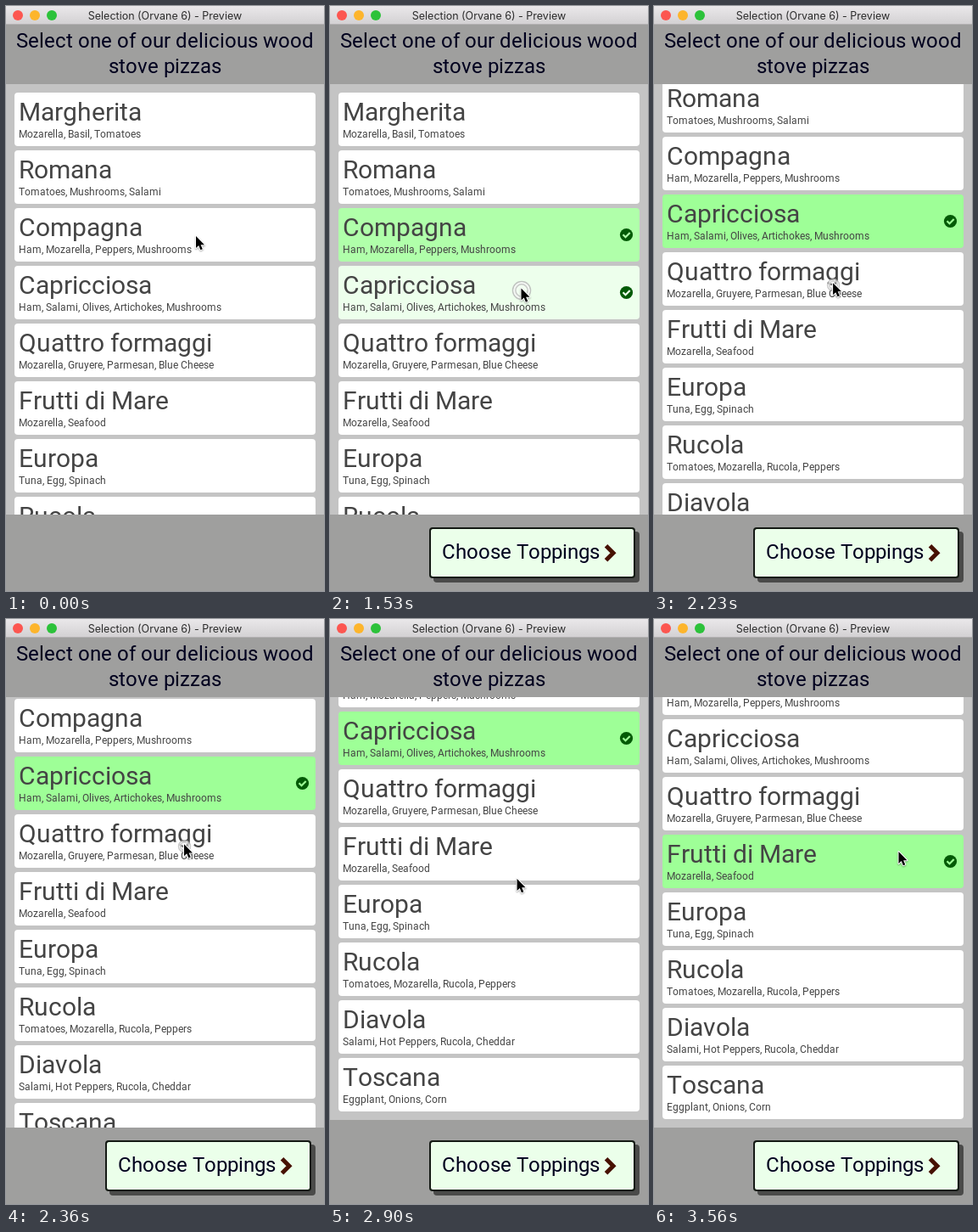
An HTML page with a canvas for the animation above (3.59 s loop, 375 by 689 pixels).

```html
<!DOCTYPE html>
<html lang="en">
<head>
<meta charset="utf-8">
<title>Pizza selection</title>
<style>
  html, body { margin: 0; width: 100%; height: 100%; overflow: hidden; background: #9f9f9e; }
  canvas { display: block; width: 375px; height: 689px; }
</style>
</head>
<body>
<canvas id="stage"></canvas>
<script>
const W = 375, H = 689, LOOP = 3590;
const LIST_TOP = 92, LIST_BOTTOM = 599, ROW_H = 63, ROW_STEP = 68;
const FADE = 300;
const GRAY = '#9f9f9e', NAVY = '#00001e', INK = '#444';
const FACE = 'Roboto, sans-serif';

const pizzas = [
  ['Margherita', 'Mozarella, Basil, Tomatoes'],
  ['Romana', 'Tomatoes, Mushrooms, Salami'],
  ['Compagna', 'Ham, Mozarella, Peppers, Mushrooms'],
  ['Capricciosa', 'Ham, Salami, Olives, Artichokes, Mushrooms'],
  ['Quattro formaggi', 'Mozarella, Gruyere, Parmesan, Blue Cheese'],
  ['Frutti di Mare', 'Mozarella, Seafood'],
  ['Europa', 'Tuna, Egg, Spinach'],
  ['Rucola', 'Tomatoes, Mozarella, Rucola, Peppers'],
  ['Diavola', 'Salami, Hot Peppers, Rucola, Cheddar'],
  ['Toscana', 'Eggplant, Onions, Corn']
];

// time and row of each tap
const taps = [[415, 2], [1476, 3], [3250, 5]];
// press start, release
const presses = [[395, 415], [1435, 1476], [1940, 2400], [3215, 3250]];

// time, x, y of the pointer tip
const pointerKeys = [
  [0, 224, 271], [100, 224, 271], [130, 218.5, 268.5], [1090, 218.5, 268.5],
  [1260, 225.5, 332.5], [1640, 225.5, 332.5], [1830, 221.5, 357], [1910, 215, 411],
  [1960, 214, 411], [2080, 213, 392], [2240, 211, 322], [2360, 210, 265.5],
  [2430, 210, 250], [2600, 212, 255], [2900, 220.5, 306], [3080, 262, 290],
  [3200, 288.5, 274], [LOOP, 288.5, 274]
];
const scrollKeys = [
  [0, 0], [1960, 0], [2080, 18], [2240, 88], [2360, 144], [2480, 180],
  [2620, 203], [2720, 206], [2900, 197], [3080, 188], [LOOP, 188]
];

const canvas = document.getElementById('stage');
const ctx = canvas.getContext('2d');
const dpr = window.devicePixelRatio || 1;
canvas.width = W * dpr;
canvas.height = H * dpr;

const clamp01 = v => Math.max(0, Math.min(1, v));

// Hermite curve through the keys, flat at turning points
function curve(keys, t, c) {
  const slope = i => (keys[i + 1][c] - keys[i][c]) / (keys[i + 1][0] - keys[i][0]);
  const tangent = i => {
    if (i === 0 || i === keys.length - 1) return 0;
    const a = slope(i - 1), b = slope(i);
    return a * b <= 0 ? 0 : 2 * a * b / (a + b);
  };
  let i = 0;
  while (i < keys.length - 2 && t >= keys[i + 1][0]) i++;
  const d = keys[i + 1][0] - keys[i][0];
  const u = (t - keys[i][0]) / d, v = 1 - u;
  return v * v * (1 + 2 * u) * keys[i][c] + u * u * (3 - 2 * u) * keys[i + 1][c]
    + u * v * d * (v * tangent(i) - u * tangent(i + 1));
}

// Text set on whole-pixel advances
const advances = {};
function text(str, x, y, size, color) {
  ctx.font = size + 'px ' + FACE;
  ctx.fillStyle = color;
  ctx.textAlign = 'left';
  for (const ch of str) {
    const key = size + ch;
    if (!(key in advances)) advances[key] = Math.round(ctx.measureText(ch).width);
    ctx.fillText(ch, x, y);
    x += advances[key];
  }
}

function box(x, y, w, h, r, color) {
  ctx.beginPath();
  ctx.roundRect(x, y, w, h, r);
  ctx.fillStyle = color;
  ctx.fill();
}

function disc(x, y, r, color) {
  ctx.beginPath();
  ctx.arc(x, y, r, 0, 7);
  ctx.fillStyle = color;
  ctx.fill();
}

function line(points, width, color) {
  ctx.beginPath();
  points.forEach(p => ctx.lineTo(p[0], p[1]));
  ctx.lineWidth = width;
  ctx.strokeStyle = color;
  ctx.stroke();
}

function selectedRow(t) {
  let row = -1;
  for (const [at, index] of taps) if (t >= at) row = index;
  return row;
}

function highlight(row, t) {
  let level = 0;
  taps.forEach(([at, index], i) => {
    if (t < at) return;
    const p = clamp01((t - at) / FADE);
    if (index === row) level = p;
    else if (i > 0 && taps[i - 1][1] === row) level = 1 - p;
  });
  return level;
}

function drawRow(i, y, t) {
  const k = highlight(i, t);
  const color = `rgb(${255 - 97 * k},255,${255 - 104 * k})`;
  box(10, y, 355, ROW_H, 4, color);
  text(pizzas[i][0], 15, y + 33, 30, INK);
  text(pizzas[i][1], 15, y + 53, 12, INK);
  if (k > 0 && (selectedRow(t) === i || k > 0.5)) {
    disc(349.5, y + 31.5, 7.6, '#035a06');
    line([[345.5, y + 31.3], [348.5, y + 34.3], [353.7, y + 29]], 2.2, color);
  }
}

function drawList(t) {
  const scroll = Math.round(curve(scrollKeys, t, 1));
  ctx.save();
  ctx.beginPath();
  ctx.rect(0, LIST_TOP, W, LIST_BOTTOM - LIST_TOP);
  ctx.clip();
  ctx.fillStyle = '#c4c4c4';
  ctx.fillRect(0, LIST_TOP - scroll, W, pizzas.length * ROW_STEP + 15);
  pizzas.forEach((_, i) => {
    const y = LIST_TOP + 10 + i * ROW_STEP - scroll;
    if (y < LIST_BOTTOM && y + ROW_H > LIST_TOP) drawRow(i, y, t);
  });
  ctx.restore();
}

function drawTitleBar() {
  const g = ctx.createLinearGradient(0, 0, 0, 22);
  g.addColorStop(0, '#eae8ea');
  g.addColorStop(1, '#d2d0d2');
  ctx.fillStyle = g;
  ctx.fillRect(0, 0, W, 22);
  ctx.fillStyle = '#b4b2b4';
  ctx.fillRect(0, 21, W, 1);
  ['#fc5650', '#fdb52c', '#2cc23a'].forEach((c, i) => disc(14 + 20 * i, 11, 6, c));
  ctx.font = '12.5px Inter, sans-serif';
  ctx.textAlign = 'center';
  ctx.fillStyle = '#2c2c2c';
  ctx.fillText('Selection (Orvane 6) - Preview', 187.5, 16);
}

function drawHeader() {
  text('Select one of our delicious wood', 12, 49, 24, NAVY);
  text('stove pizzas', 121, 79, 24, NAVY);
}

function drawButton() {
  box(122, 619, 243, 60, 4, '#4a4a49');
  box(117, 614, 243, 60, 4, '#141a14');
  box(119, 616, 239, 56, 2.5, '#ebffea');
  text('Choose Toppings', 132, 651, 24, NAVY);
  line([[325.5, 635.8], [334, 644.3], [325.5, 652.8]], 5, '#471100');
}

function ring(x, y, r, alpha) {
  ctx.save();
  ctx.globalAlpha = alpha;
  disc(x, y, r, 'rgba(255,255,255,.4)');
  for (const [radius, width, color] of [[r, 1.5, '#b4b4b4'], [r - 1.8, 2, '#f4f4f4'], [r * 0.68, 1.5, '#bdbdbd']]) {
    ctx.beginPath();
    ctx.arc(x, y, radius, 0, 7);
    ctx.lineWidth = width;
    ctx.strokeStyle = color;
    ctx.stroke();
  }
  ctx.restore();
}

function drawTouch(x, y, t) {
  for (const [down, up] of presses) {
    if (t < down || t > up + FADE) continue;
    const since = t - up;
    if (since < 0) ring(x, y, 7, 0.7);
    else ring(x, y, 8.7 + 0.0325 * since, 1 - since / FADE);
  }
}

function drawPointer(x, y) {
  const shape = [[0, 0], [0, 14], [3.2, 11], [5.4, 16.2], [7.8, 15.2], [5.6, 10.2], [10, 10.2]];
  ctx.save();
  ctx.translate(x, y);
  ctx.beginPath();
  shape.forEach(p => ctx.lineTo(p[0], p[1]));
  ctx.closePath();
  ctx.lineJoin = 'round';
  ctx.lineWidth = 2;
  ctx.strokeStyle = '#fff';
  ctx.shadowColor = 'rgba(0,0,0,.35)';
  ctx.shadowBlur = 2 * dpr;
  ctx.shadowOffsetY = dpr;
  ctx.stroke();
  ctx.shadowColor = 'transparent';
  ctx.fillStyle = '#000';
  ctx.fill();
  ctx.restore();
}

function draw(t) {
  ctx.setTransform(dpr, 0, 0, dpr, 0, 0);
  ctx.fillStyle = GRAY;
  ctx.fillRect(0, 0, W, H);
  drawList(t);
  drawTitleBar();
  drawHeader();
  if (t >= taps[0][0]) drawButton();
  const x = curve(pointerKeys, t, 1), y = curve(pointerKeys, t, 2);
  drawTouch(x + 0.5, y + 2.5, t);
  drawPointer(x, y);
}

const start = performance.now();
function tick() {
  draw((performance.now() - start) % LOOP);
  requestAnimationFrame(tick);
}
tick();
</script>
</body>
</html>
```
